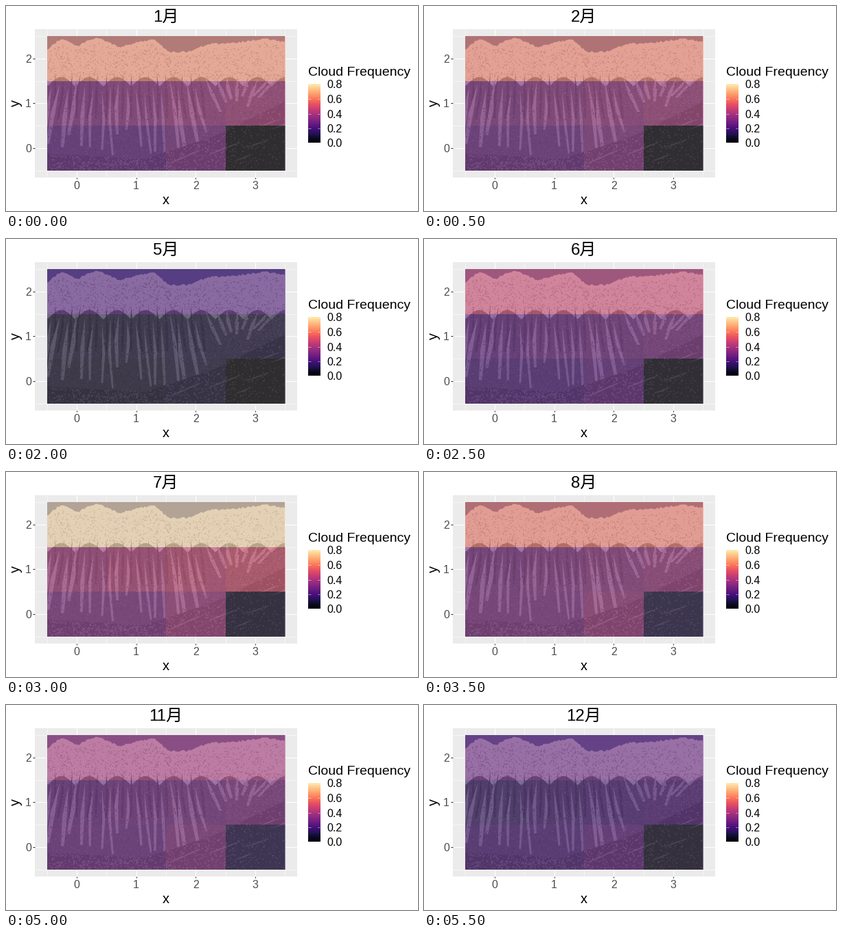
Recreate the animation shown at these times as a matplotlib script. Size 600 by 300 pixels, loop 6 s.

```python
import matplotlib.pyplot as plt
import numpy as np
from matplotlib.animation import FuncAnimation
from matplotlib.patches import Polygon, Rectangle

W, H, DPI = 600, 300, 100
MONTHS = 12
TILE_W, TILE_H = 86.65, 65.6
LEFT, TOP = 59.6, 44.0
RIGHT, BOTTOM = LEFT + 4 * TILE_W, TOP + 3 * TILE_H
PANEL_X, PANEL_Y = (42.1, 423.5), (34, 250.5)
SKY, SNOW, FACE, ROCK, SCREE = "#686b8e", "#cdc6cc", "#8e878c", "#716c71", "#5f5a5c"
FONTS = ["Liberation Sans", "Noto Sans CJK JP"]

# Cloud level of each height band (share of the colour scale) at the turning months
KEY_MONTHS = [1, 4, 5, 7, 8, 10, 12]
SUMMIT = [.76, .66, .23, .93, .71, .66, .30]
SLOPE = [.43, .40, .09, .54, .40, .46, .20]
VALLEY = [.28, .35, .07, .37, .36, .39, .22]
CORNER = [.00, .06, .00, .07, .12, .20, .06]

rng = np.random.default_rng(7)


def cover(month):
    """Cloud shares by row and column; the slopes get cloudier to the right."""
    summit, slope, valley, corner = (np.interp(month, KEY_MONTHS, band)
                                     for band in (SUMMIT, SLOPE, VALLEY, CORNER))
    col = np.arange(4)
    return np.array([np.full(4, summit),
                     slope * (1 + 0.08 * (col - 1.5)),
                     np.where(col == 3, corner, valley * (1 + 0.25 * (col == 2)))])


fig = plt.figure(figsize=(W / DPI, H / DPI), dpi=DPI, facecolor="white")
ax = fig.add_axes([0, 0, 1, 1])
ax.axis("off")


def label(x, y, text, px, color="black", **kw):
    kw = {"ha": "center", "va": "center", **kw}
    return ax.text(x, y, text, fontsize=px * 72 / DPI, color=color, family=FONTS, **kw)


def line(x, y, px, color, z=1):
    ax.plot(x, y, color=color, lw=px * 72 / DPI, solid_capstyle="butt", zorder=z)


def box(x0, y0, x1, y1, color, z):
    return ax.add_patch(Rectangle((x0, y0), x1 - x0, y1 - y0, fc=color, lw=0, zorder=z))


def shape(points, color, z):
    ax.add_patch(Polygon(points, fc=color, lw=0, zorder=z)).set_clip_path(frame)


def below(x, y, color, z):
    """Fill everything under a contour."""
    shape([*zip(x, y), (RIGHT, BOTTOM), (LEFT, BOTTOM)], color, z)


def streak(x0, y0, x1, y1, width, color, z):
    """A tapered, slightly bent strip running downhill."""
    xm, ym = (x0 + x1) / 2 + rng.uniform(-3, 3), (y0 + y1) / 2
    shape([(x0, y0), (xm + width / 2, ym), (x1 + width / 3, y1),
           (x1 - width / 3, y1), (xm - width / 2, ym)], color, z)


def speckle(count, top, bottom, color, z, size=0.7):
    """Fine grains between two contours given as functions of x."""
    x = rng.uniform(LEFT, RIGHT, count)
    y = top(x) + rng.uniform(0, 1, count) * (bottom(x) - top(x))
    ax.scatter(x, y, s=rng.uniform(0.3, 2, count) * size, c=color, lw=0,
               zorder=z).set_clip_path(frame)


# Panel, grid and axes
box(PANEL_X[0], PANEL_Y[0], PANEL_X[1], PANEL_Y[1], "#ebebeb", 0)
for i in range(5):
    x = LEFT + i * TILE_W
    line([x, x], PANEL_Y, 0.55, "white")
    if i < 4:
        x += TILE_W / 2
        line([x, x], PANEL_Y, 1.07, "white")
        line([x, x], [PANEL_Y[1], PANEL_Y[1] + 2.8], 1.07, "#333333")
        label(x, 262, str(i), 16, "#4d4d4d", va="center_baseline")
for i in range(4):
    y = BOTTOM - i * TILE_H
    line(PANEL_X, [y, y], 0.55, "white")
    if i < 3:
        y -= TILE_H / 2
        line(PANEL_X, [y, y], 1.07, "white")
        line([PANEL_X[0] - 2.8, PANEL_X[0]], [y, y], 1.07, "#333333")
        label(37, y, str(i), 16, "#4d4d4d", ha="right", va="center_baseline")
label(233, 290, "x", 20, va="baseline")
label(14, 142, "y", 20, rotation=90)


# Contours of the mountain range
def ridge(x):
    return np.interp(x, [59, 80, 105, 131, 165, 214, 237, 265, 295, 340, 378, 406],
                     [64, 48, 58, 46, 60, 48, 67, 67, 56, 53, 48, 52])


def treeline(x):
    return 118 - 14 * np.abs(np.sin((x - 60) / 13))


def foot(x):
    return np.interp(x, [59, 200, 300, 406], [216, 224, 192, 140])


frame = box(LEFT, TOP, RIGHT, BOTTOM, SKY, 2)
xs = np.arange(LEFT, RIGHT + 2, 2.5)
below(xs, ridge(xs) + rng.uniform(-1.5, 1.5, xs.size), SNOW, 3)
below(xs, treeline(xs), ROCK, 4)
below(xs, foot(xs), SCREE, 6)

# Snow gullies fan out from the middle of the face, dark ribs between them
for x in np.linspace(66, 275, 18):
    drift = (x - 160) * 0.15 + rng.uniform(-6, 6)
    streak(x, rng.uniform(104, 126), x + drift, rng.uniform(180, 222),
           rng.uniform(4, 7), "#aaa4aa", 5)
    streak(x + 6, 98, x + 6 + drift / 2, 165, 4, SCREE, 5)
for x in np.linspace(290, 400, 8):
    streak(x, 104, x + (335 - x) * 0.5, rng.uniform(130, 160), 6, "#aaa4aa", 5)
for x in np.linspace(250, 400, 9):
    y = foot(x) + rng.uniform(10, 60)
    shape([(x - 16, y + 7), (x + 4, y - 2), (x + 18, y - 6), (x + 2, y + 1)], FACE, 7)

# Rock and snow grain
speckle(1500, lambda x: ridge(x) + 6, treeline, FACE, 7)
speckle(1500, treeline, foot, FACE, 7)
speckle(1100, treeline, foot, SCREE, 7)
speckle(1100, foot, lambda x: BOTTOM + 0 * x, FACE, 7, 1.1)

tiles = ax.imshow(cover(1), cmap="magma", vmin=0, vmax=1, alpha=0.5, zorder=8,
                  extent=(LEFT, RIGHT, BOTTOM, TOP), interpolation="nearest", aspect="auto")

# Colour bar
label(440, 101.5, "Cloud Frequency", 19.5, ha="left", va="baseline")
ax.imshow(np.linspace(0.96, 0, 256)[:, None], cmap="magma", vmin=0, vmax=1, zorder=2,
          extent=(440, 457.3, 200.5, 114.5), aspect="auto")
for i in range(5):
    y = 200.5 - 21.5 * i
    for x in (440, 453.8):
        line([x, x + 3.5], [y, y], 0.5, "white", 3)
    label(467, y, f"{i * 0.2:.1f}", 16, ha="left", va="center_baseline")

title = label(232.5, 23, "", 24, va="baseline")
ax.set(xlim=(0, W), ylim=(H, 0))


def update(i):
    tiles.set_data(cover(i + 1))
    title.set_text(f"{i + 1}月")
    return tiles, title


anim = FuncAnimation(fig, update, frames=MONTHS, interval=500, repeat=True, repeat_delay=0)
plt.show()
```
